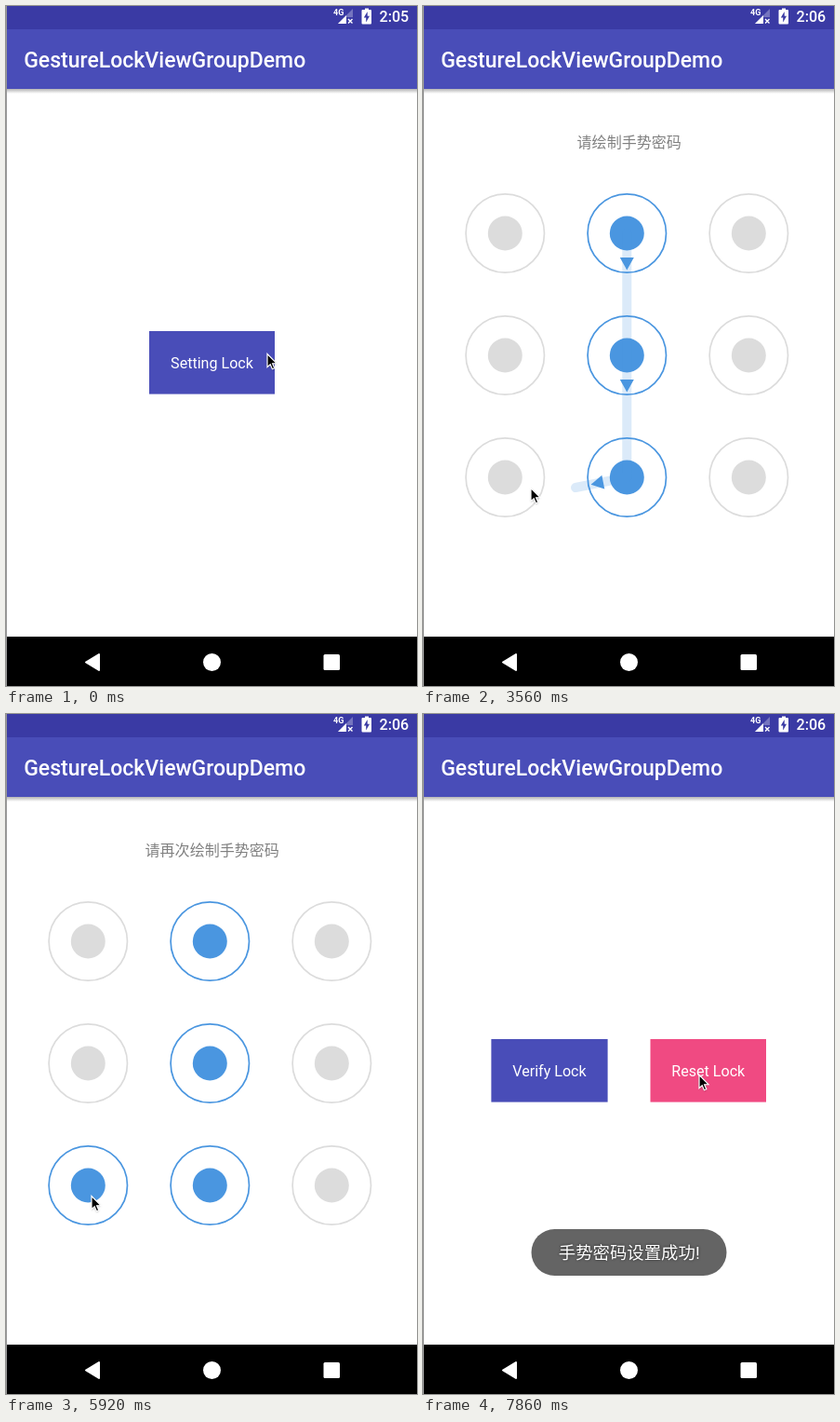
Animation of 442 by 730 pixels, one loop 8 s. Source, as an HTML page with a canvas:

```html
<!DOCTYPE html>
<html lang="zh-CN">
<head>
<meta charset="utf-8">
<title>Gesture lock</title>
<style>
html, body { margin: 0; width: 442px; height: 730px; overflow: hidden; }
canvas { display: block; }
</style>
</head>
<body>
<canvas id="stage" width="442" height="730"></canvas>
<script>
const stage = document.getElementById('stage').getContext('2d');
const windowLayer = new OffscreenCanvas(442, 682).getContext('2d');
let c = stage;   // current drawing context

const LOOP = 8000, STEP = 148;
const OPEN = 10, AGAIN = 27, SAVED = 41, CLOSE = 42;   // steps at which the screen changes
const PRIMARY = '#494db8', DARK = '#3a3aa4', PINK = '#f04a82', BLUE = '#4a96e0', IDLE = '#dcdcdc';
const FONT = 'Roboto, "Noto Sans CJK SC", "Noto Sans CJK", sans-serif';

// Pointer moves; power 1 is a steady drag, 2 slows down towards the end.
const move = (start, end, x, y, power = 2) => ({ start, end, x, y, power });
const MOVES = [
  move(0, 5, 255, 379),
  move(11, 16, 226, 239),
  move(17, 21.7, 227, 517, 1),
  move(21.7, 24.5, 91, 517, 1),
  move(28, 31, 225, 245),
  move(33, 37.2, 226, 517, 1),
  move(37.2, 39, 91, 517, 1),
  move(42, 49, 308, 386),
  move(52, 53, 296, 387)
];
const NODES = [[1, 0], [1, 1], [1, 2], [0, 2]];   // pattern cells: column, row
const STROKES = [{ down: 17, up: 26, clear: AGAIN }, { down: 34, up: 40, clear: SAVED }];

function pointer(s) {
  let x = 280, y = 373;
  for (const m of MOVES) {
    const k = Math.min(1, Math.max(0, (s - m.start) / (m.end - m.start)));
    const e = 1 - (1 - k) ** m.power;
    x += (m.x - x) * e;
    y += (m.y - y) * e;
  }
  return [Math.round(x), Math.round(y)];
}

// The screen follows the pointer one step late.
const finger = s => pointer(s - 1);
const center = ([col, row]) => [88.3 + 131 * col, 244 + 131 * row];

function touched(node, from, to) {
  const [x, y] = center(node);
  for (let s = from; s <= to; s++) {
    const [fx, fy] = finger(s);
    if (Math.hypot(fx - x, fy - y) < 42) return true;
  }
  return false;
}

function rect(x, y, w, h, color) {
  c.fillStyle = color;
  c.fillRect(x, y, w, h);
}

function round(x, y, w, h, r, color) {
  c.beginPath();
  c.roundRect(x, y, w, h, r);
  c.fillStyle = color;
  c.fill();
}

function poly(points, color) {
  c.beginPath();
  points.forEach(p => c.lineTo(...p));
  c.closePath();
  c.fillStyle = color;
  c.fill();
}

function disc(x, y, r, color) {
  c.beginPath();
  c.arc(x, y, r, 0, 7);
  c.fillStyle = color;
  c.fill();
}

function text(str, x, y, size, color, align = 'center', weight = 400) {
  c.font = `${weight} ${size}px ${FONT}`;
  c.textAlign = align;
  c.fillStyle = color;
  c.fillText(str, x, y);
}

function appWindow() {
  rect(1, 0, 441, 677, '#fff');
  const shade = c.createLinearGradient(0, 89, 0, 94);
  shade.addColorStop(0, '#b4b4b4');
  shade.addColorStop(1, '#fff');
  rect(1, 89, 441, 5, shade);
  rect(1, 0, 441, 25, DARK);
  rect(1, 25, 441, 64, PRIMARY);
  text('GestureLockViewGroupDemo', 19.2, 66, 23, '#fff', 'left', 500);
}

function button(label, x, w, color) {
  rect(x, 349, w, 67.6, color);
  text(label, x + w / 2, 389, 16.08, '#fff');
}

function mainScreen(locked) {
  appWindow();
  if (locked) {
    button('Verify Lock', 73.4, 125.2, PRIMARY);
    button('Reset Lock', 244.5, 124.5, PINK);
  } else {
    button('Setting Lock', 154, 135, PRIMARY);
  }
}

function arrow([x, y], [tx, ty]) {
  c.save();
  c.translate(x, y);
  c.rotate(Math.atan2(tx - x, y - ty));
  poly([[0, -39.5], [7.5, -26], [-7.5, -26]], BLUE);
  c.restore();
}

function lockScreen(s) {
  appWindow();
  text(s < AGAIN ? '请绘制手势密码' : '请再次绘制手势密码', 221.7, 151.8, 16.05, '#808080');
  const stroke = STROKES.find(k => s >= k.down && s < k.clear);
  const lit = stroke ? NODES.filter(n => touched(n, stroke.down, s)) : [];
  for (let row = 0; row < 3; row++) for (let col = 0; col < 3; col++) {
    const [x, y] = center([col, row]);
    const color = lit.some(n => n[0] === col && n[1] === row) ? BLUE : IDLE;
    disc(x, y, 18.5, color);
    c.beginPath();
    c.arc(x, y, 42.2, 0, 7);
    c.lineWidth = 1.7;
    c.strokeStyle = color;
    c.stroke();
  }
  if (!stroke || s >= stroke.up) return;
  const trail = [...lit.map(center), finger(s)];
  lit.forEach((_, i) => arrow(trail[i], trail[i + 1]));
  c.beginPath();
  trail.forEach(p => c.lineTo(...p));
  c.lineWidth = 10;
  c.lineJoin = c.lineCap = 'round';
  c.strokeStyle = 'rgba(74,150,224,.2)';
  c.stroke();
}

// Draws the lock screen apart, so that it can slide and fade as a whole.
function showLock(s, shift, alpha) {
  c = windowLayer;
  lockScreen(s);
  c = stage;
  c.globalAlpha = alpha;
  c.drawImage(windowLayer.canvas, 0, shift);
  c.globalAlpha = 1;
  rect(1, 0, 441, shift, DARK);
}

function systemIcons(s) {
  text('4G', 352, 10, 9, '#fff', 'left', 700);
  poly([[373, 3], [373, 12], [366, 12], [366, 19], [357, 19]], 'rgba(255,255,255,.3)');
  poly([[366, 10], [366, 19], [357, 19]], '#fff');
  c.strokeStyle = '#fff';
  c.lineCap = 'butt';
  c.lineWidth = 1.4;
  c.beginPath();
  c.moveTo(368, 14); c.lineTo(372.5, 18.5);
  c.moveTo(372.5, 14); c.lineTo(368, 18.5);
  c.stroke();
  rect(386, 2.5, 4, 2, '#fff');
  round(382.5, 4, 10.5, 15.5, 1, '#fff');
  poly([[388.7, 6], [384.8, 12.6], [387.2, 12.6], [387.2, 17.5], [391, 10.8], [388.7, 10.8]], DARK);
  text(s < 18 ? '2:05' : '2:06', 401.5, 17.3, 16.1, '#fff', 'left', 500);

  c.lineJoin = 'round';
  c.lineWidth = 2;
  poly([[86, 704.5], [100, 696], [100, 713]], '#fff');
  c.stroke();
  disc(221.5, 704.5, 9.5, '#fff');
  round(341.5, 696, 17.5, 17, 1.5, '#fff');
}

function toast(alpha) {
  c.globalAlpha = alpha;
  round(116.5, 553, 210, 50, 25, '#646464');
  c.globalAlpha = Math.min(1, alpha * 1.6);
  c.shadowColor = 'rgba(0,0,0,.7)';
  c.shadowBlur = 3;
  text('手势密码设置成功!', 221.7, 585, 18.4, '#fff');
  c.shadowColor = 'transparent';
  c.globalAlpha = 1;
}

function cursor([x, y]) {
  c.save();
  c.translate(x + 1, y + .5);
  c.shadowColor = 'rgba(0,0,0,.35)';
  c.shadowBlur = 2;
  c.shadowOffsetY = 1;
  poly([[0, 0], [0, 14.2], [3.2, 11.2], [5.4, 16.3], [7.8, 15.3], [5.6, 10.3], [10, 10.1]], '#000');
  c.shadowColor = 'transparent';
  c.lineJoin = 'miter';
  c.lineWidth = 1.2;
  c.strokeStyle = '#fff';
  c.stroke();
  c.restore();
}

function draw(s) {
  rect(0, 0, 442, 730, '#000');
  if (s < OPEN) {
    mainScreen(false);
  } else if (s === OPEN) {
    rect(1, 677, 441, 5, '#eee');
    showLock(s, 5, 1);
  } else if (s < CLOSE) {
    showLock(s, 0, 1);
  } else {
    mainScreen(true);
    if (s === CLOSE) {
      rect(1, 0, 441, 677, 'rgba(0,0,0,.13)');
      showLock(s, 7, .63);
    }
  }
  systemIcons(s);
  if (s >= SAVED) toast(Math.min(1, .25 + .37 * (s - SAVED)));
  rect(0, 0, 1, 730, '#999');
  cursor(pointer(s));
}

let last = -1;
function tick(now) {
  const s = Math.min(53, Math.floor(now % LOOP / STEP));
  if (s !== last) draw(last = s);
  requestAnimationFrame(tick);
}
draw(0);
requestAnimationFrame(tick);
</script>
</body>
</html>
```
